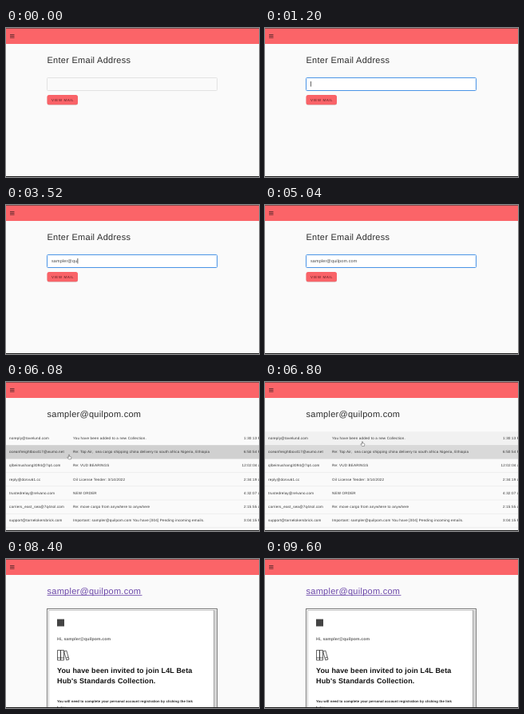
These frames come from a looping animation (317x187 px, 9680 ms). An HTML page:

```html
<!DOCTYPE html>
<html lang="en">
<head>
<meta charset="utf-8">
<title>Mail viewer</title>
<style>
  html, body { margin: 0; width: 100%; height: 100%; overflow: hidden; background: #fafafa; }
  svg { display: block; width: 317px; height: 187px; }
  text { font-family: "Liberation Sans", Arial, sans-serif; fill: #222; white-space: pre; text-rendering: geometricPrecision; }
  .title { font-size: 11px; letter-spacing: .27px; fill: #2b2b2b; }
  .link { fill: #6a45a8; }
  .field { font-size: 5.4px; letter-spacing: .17px; fill: #444; }
  .label { font-size: 4.4px; letter-spacing: .6px; fill: #571c20; }
  .row { font-size: 4.55px; letter-spacing: .17px; fill: #333; }
  .bold { font-weight: bold; }
  .hello { font-size: 5.2px; letter-spacing: .08px; fill: #666; }
  .head { font-size: 9px; letter-spacing: .14px; fill: #111; }
  .para { font-size: 4.3px; letter-spacing: .07px; }
</style>
</head>
<body>
<svg viewBox="0 0 317 187">
  <rect width="317" height="187" fill="#fafafa"/>

  <g id="form">
    <text class="title" x="51.5" y="44.2">Enter Email Address</text>
    <rect id="box" x="51.5" y="62.5" width="213" height="16" rx="1"/>
    <text id="typed" class="field" x="57" y="72.3"></text>
    <rect id="caret" y="67" width=".7" height="6.5" fill="#222"/>
    <rect x="51.5" y="85" width="38.5" height="12" rx="2.5" fill="#000" opacity=".14"/>
    <rect id="button" x="51.5" y="84" width="38.5" height="12.3" rx="2.5" fill="#f96368"/>
    <text class="label" x="57" y="91.7">VIEW MAIL</text>
  </g>

  <g id="inbox">
    <text class="title" x="51.5" y="44" data-address></text>
    <g id="rows"></g>
  </g>

  <g id="mail">
    <text class="title link" x="51.5" y="44" data-address></text>
    <rect x="51.5" y="45.2" width="119" height=".8" fill="#6a45a8"/>
    <rect x="51.5" y="62.5" width="213" height="140" fill="#fff" stroke="#777"/>
    <path d="M53.5 187V64.5H260" fill="none" stroke="#bbb" stroke-width=".8"/>
    <rect x="260.5" y="64" width="3" height="123" fill="#d0d0d0"/>
    <path d="M260.5 64V187" stroke="#999" stroke-width=".8"/>
    <rect x="64" y="75.5" width="9" height="9" fill="#444"/>
    <text class="bold hello" x="64" y="101.8">Hi, <tspan data-address></tspan></text>
    <g fill="none" stroke="#222" stroke-width=".7">
      <path d="M64.5 114.5h4v12.5h-4zM68.5 114.5h4v12.5h-4zM64.5 124h8"/>
      <path d="M72.6 116l3.2-1 3.2 11-3.2 1zM75.2 124.2l3-1"/>
    </g>
    <text class="bold head" x="64" y="142.7">You have been invited to join L4L Beta</text>
    <text class="bold head" x="64" y="156.4">Hub's Standards Collection.</text>
    <text class="bold para" x="64" y="180.4">You will need to complete your personal account registration by clicking the link</text>
    <text class="bold para" x="64" y="187.6">below.</text>
  </g>

  <rect width="317" height="20" fill="#fb6468"/>
  <rect width="317" height="1" fill="#8a4a4c"/>
  <path d="M5 8.5h5.5M5 10.3h5.5M5 12.1h5.5" stroke="#4a2426" stroke-width=".8"/>
  <rect y="186" width="317" height="1" fill="#1c1c1c"/>

  <g id="cursor">
    <path id="hand" d="M-.8 .6Q0-.6.8.6V3.4l2.5.6q1 .3.8 1.4L3.4 8.5H-.6L-3 5.4q-.3-1 .7-.9L-.8 5.4z"
      transform="scale(.7)" fill="#fff" stroke="#444" stroke-width=".7"/>
    <path id="arrow" d="M0 0V6.2L1.5 4.9 2.5 7.1 3.5 6.6 2.6 4.6H4.5z"
      transform="scale(.7)" fill="#111" stroke="#fff" stroke-width=".4"/>
  </g>
</svg>
<script>
  const LOOP = 9680;
  const FOCUS = 880, PRESS = 5640, INBOX = 5840, HOVER = 6760, FADE = 200, SETTLED = 7200, OPEN = 8240;
  const ADDRESS = "sampler@quilpom.com";
  const ROWS = [
    ["noreply@tavelund.com", "You have been added to a new Collection.", "1:30:13 PM"],
    ["oceanfreightbox417@wumo.net", "Re: Top Air,  sea cargo shipping china delivery to south africa Nigeria, Ethiopia", "6:50:54 PM"],
    ["qlbeimushang3094@7q4.com", "Re: VUD BEARINGS", "12:02:04 am"],
    ["reply@dorvu61.cc", "Oil License Tender: 3/14/2022", "2:34:19 am"],
    ["trustedrelay@relvano.com", "NEW ORDER", "4:32:07 am"],
    ["carriers_east_sea@7q4nol.com", "Re: move cargo from anywhere to anywhere", "2:15:55 am"],
    ["support@tarnelokersbrick.com", `Important: ${ADDRESS} You have [004] Pending incoming emails.`, "3:04:15 PM"]
  ];
  // [time, characters] and [time, x, y]
  const TYPING = [[1200, 0], [2160, 5], [3440, 10], [4800, 19]];
  const PATH = [[5160, 96, 99], [5440, 76, 91], [6400, 80, 91], [6800, 122, 74.5], [7200, 125, 71.5]];

  const $ = id => document.getElementById(id);
  const show = (id, on) => { $(id).style.display = on ? "" : "none"; };

  function add(parent, tag, attrs, content = "") {
    const el = document.createElementNS("http://www.w3.org/2000/svg", tag);
    for (const key in attrs) el.setAttribute(key, attrs[key]);
    el.textContent = content;
    return parent.appendChild(el);
  }

  function sample(steps, t, ease = k => k) {
    if (t <= steps[0][0]) return steps[0].slice(1);
    for (let i = 1; i < steps.length; i++) {
      const [a, ...from] = steps[i - 1], [b, ...to] = steps[i];
      if (t < b) return from.map((v, j) => v + (to[j] - v) * ease((t - a) / (b - a)));
    }
    return steps[steps.length - 1].slice(1);
  }
  const smooth = k => k * k * (3 - 2 * k);

  document.querySelectorAll("[data-address]").forEach(el => { el.textContent = ADDRESS; });

  const bands = ROWS.map(([from, subject, time], i) => {
    const y = 62.2 + 17.2 * i, base = y + 9.7;
    const band = add($("rows"), "rect", { y, width: 317, height: 17.2, fill: "#000" });
    add($("rows"), "rect", { y: y + 16.8, width: 317, height: .5, fill: "#e2e2e2" });
    add($("rows"), "text", { class: "row", x: 4, y: base }, from);
    add($("rows"), "text", { class: "row", x: 84, y: base }, subject);
    add($("rows"), "text", { class: "row", x: time.length > 10 ? 295.5 : 298, y: base }, time);
    return band;
  });

  function draw(t) {
    show("form", t < INBOX);
    show("inbox", t >= INBOX && t < OPEN);
    show("mail", t >= OPEN);

    const focused = t >= FOCUS;
    $("box").setAttribute("stroke", focused ? "#4a94e6" : "#e2e2e2");
    $("box").setAttribute("fill", focused ? "#fff" : "#fafafa");
    const count = Math.floor(sample(TYPING, t)[0] + 1e-6);
    $("typed").textContent = ADDRESS.slice(0, count);
    if (t < INBOX) $("caret").setAttribute("x", 57.2 + (count ? $("typed").getComputedTextLength() : 0));
    show("caret", focused && (t < 4960 || t >= 5440));
    $("button").setAttribute("fill", t >= PRESS ? "#e4575c" : "#f96368");

    // the highlight fades from the second row to the first
    const [lit] = sample([[HOVER, 0], [HOVER + FADE, 1]], t);
    const glow = [lit, 1 - lit];
    bands.forEach((band, i) => band.setAttribute("opacity", .17 * (glow[i] || 0)));

    const [x, y] = sample(PATH, t, smooth);
    $("cursor").setAttribute("transform", `translate(${x} ${y})`);
    show("cursor", t >= 5160 && t < OPEN);
    show("hand", t < SETTLED);
    show("arrow", t >= SETTLED);
  }

  const start = performance.now();
  function tick() {
    draw((performance.now() - start) % LOOP);
    requestAnimationFrame(tick);
  }
  tick();
</script>
</body>
</html>
```
